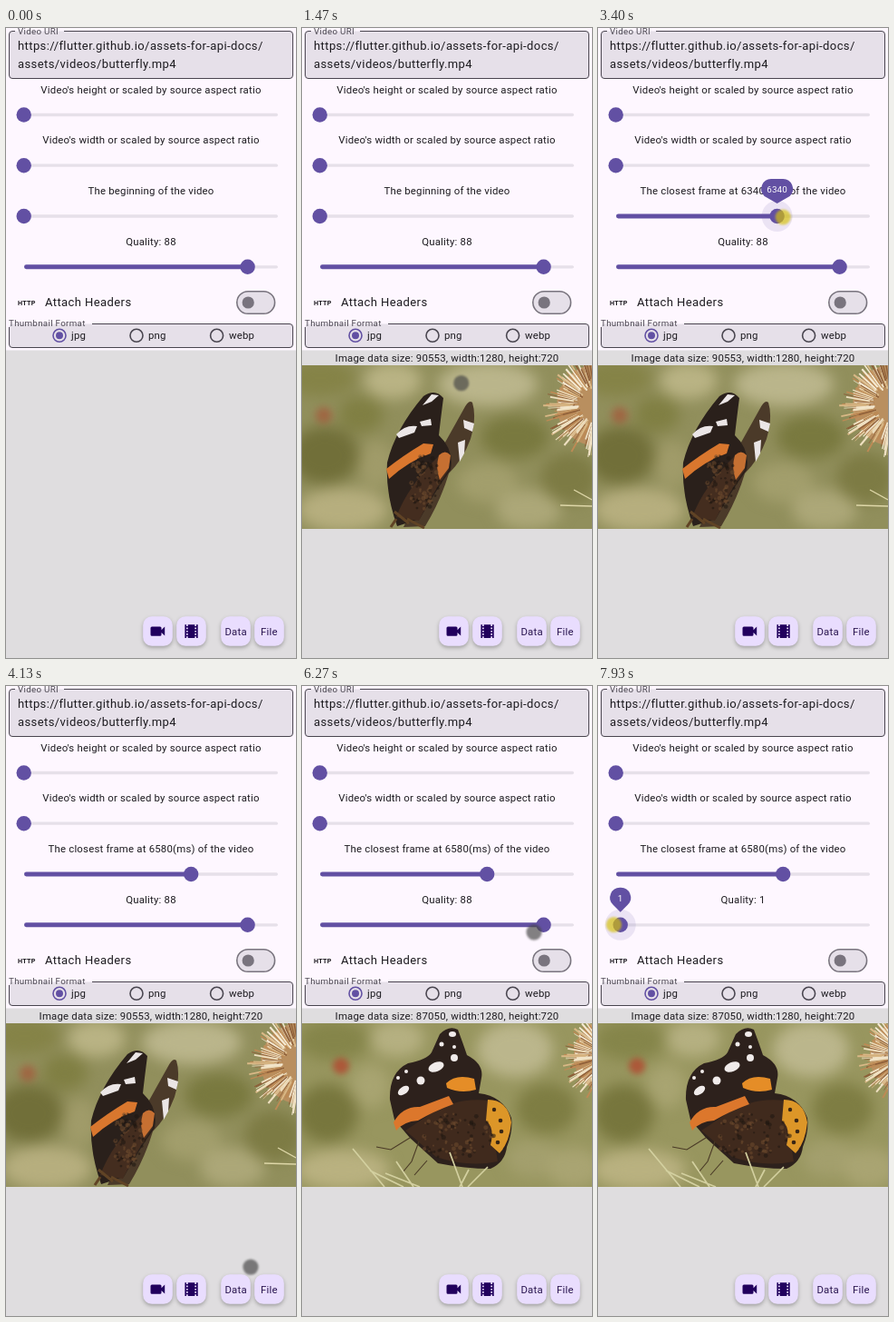
Recreate the animation shown at these times as an HTML page. Size 320 by 693 pixels, loop 8 s.

```html
<!DOCTYPE html>
<html lang="en">
<head>
<meta charset="utf-8">
<title>Video thumbnail demo</title>
<style>
  html, body { margin: 0; width: 100%; height: 100%; overflow: hidden; background: #dfdddf; }
  svg { display: block; }
  #stage { width: 100vw; height: 100vh; }
  text { font-family: Roboto, sans-serif; font-size: 11.4px; letter-spacing: .204px; fill: #1d1b20; white-space: pre; }
  .mid { text-anchor: middle; }
  .big { font-size: 13.03px; letter-spacing: .407px; }
  .label { font-size: 9.77px; letter-spacing: .305px; fill: #49454f; }
  .field { fill: #e6e0e9; stroke: none; }
  .outline { fill: none; stroke: #49454f; stroke-width: 1; }
  .fab { fill: #e9ddfe; filter: drop-shadow(0 2px 2px rgba(0, 0, 0, .28)); }
  .ink { fill: #21005d; }
  .fabText { fill: #2a1650; }
  .blur { filter: blur(8px); }
  .soft { filter: blur(.7px); }
</style>
</head>
<body>
<svg id="stage" viewBox="0 0 320 693" preserveAspectRatio="none">
  <rect width="320" height="693" fill="#dfdddf"/>
  <rect width="320" height="354.5" fill="#fef7ff"/>

  <rect class="field" x="3.5" y="3.5" width="313" height="52" rx="3.5"/>
  <path class="outline" d="M10 3.5H7Q3.5 3.5 3.5 7V52Q3.5 55.5 7 55.5H313Q316.5 55.5 316.5 52V7Q316.5 3.5 313 3.5H64"/>
  <text class="label" x="13" y="6.6">Video URI</text>
  <text class="big" x="13" y="23.8">https://flutter.github.io/assets-for-api-docs/</text>
  <text class="big" x="13" y="43.6">assets/videos/butterfly.mp4</text>

  <text class="mid" x="160" y="71.7">Video's height or scaled by source aspect ratio</text>
  <text class="mid" x="160" y="127.4">Video's width or scaled by source aspect ratio</text>
  <text class="mid" x="160" y="183.1" id="timeText"></text>
  <text class="mid" x="160" y="238.9" id="qualityText"></text>
  <g id="sliders"></g>

  <text x="13" y="304.6" style="font-size:7.2px;font-weight:700;letter-spacing:.3px">HTTP</text>
  <text class="big" x="43" y="306.3">Attach Headers</text>
  <rect x="254.8" y="289.7" width="41.8" height="24.6" rx="12.3" fill="#e6e0e9" stroke="#79747e" stroke-width="1.6"/>
  <circle cx="267.2" cy="302" r="6.6" fill="#79747e"/>

  <rect class="field" x="3.5" y="325.5" width="313" height="26" rx="3.5"/>
  <path class="outline" d="M3.5 329V348Q3.5 351.5 7 351.5H313Q316.5 351.5 316.5 348V329Q316.5 325.5 313 325.5H95"/>
  <text class="label" x="3" y="328.4">Thumbnail Format</text>
  <g fill="none" stroke="#49454f" stroke-width="1.6">
    <circle cx="59" cy="338.3" r="7" stroke="#6250a3"/>
    <circle cx="144" cy="338.3" r="7"/>
    <circle cx="232.6" cy="338.3" r="7"/>
  </g>
  <circle cx="59" cy="338.3" r="4" fill="#6250a3"/>
  <text x="72" y="342.4">jpg</text>
  <text x="157" y="342.4">png</text>
  <text x="246" y="342.4">webp</text>

  <text class="mid" x="160" y="367" id="sizeText"></text>

  <svg id="photoA" x="0" y="371" width="320" height="180" viewBox="0 371 320 180">
    <rect y="371" width="320" height="180" fill="#918f5c"/>
    <g class="blur">
      <ellipse cx="20" cy="385" rx="40" ry="20" fill="#858347"/>
      <ellipse cx="100" cy="388" rx="32" ry="20" fill="#b9b384"/>
      <ellipse cx="205" cy="392" rx="55" ry="24" fill="#bab58b"/>
      <ellipse cx="65" cy="425" rx="25" ry="20" fill="#807f43"/>
      <ellipse cx="25" cy="470" rx="38" ry="32" fill="#716f39"/>
      <ellipse cx="82" cy="480" rx="20" ry="26" fill="#a09b69"/>
      <ellipse cx="45" cy="530" rx="50" ry="24" fill="#b6ae7e"/>
      <ellipse cx="235" cy="450" rx="38" ry="24" fill="#79793f"/>
      <ellipse cx="205" cy="500" rx="34" ry="22" fill="#a29e6c"/>
      <ellipse cx="250" cy="530" rx="36" ry="22" fill="#aca778"/>
      <ellipse cx="295" cy="495" rx="32" ry="28" fill="#7d7b44"/>
    </g>
    <circle cx="24" cy="426" r="9" fill="#a5583a" opacity=".75" style="filter:blur(4px)"/>
    <g class="thistle" data-at="326,415" data-size="59"></g>
    <path d="M285 525L320 526M300 508L320 519" stroke="#ded7a8" stroke-width="1.3"/>
    <g class="soft">
      <path d="M178 420Q184 408 188 412Q193 428 186 452Q178 474 162 490Q153 520 136 548L112 549L150 470Z" fill="#4b3a29"/>
      <path d="M134 405Q147 396 156 407Q153 430 151 448Q168 464 164 486Q148 508 130 540L105 548Q92 512 94 478Q103 441 134 405Z" fill="#2a201b"/>
      <path d="M104 538Q117 503 152 470L162 486Q146 508 129 542Z" fill="#442d1f"/>
      <path d="M93 485Q112 470 134 457L145 458L142 468Q118 476 96 496Z" fill="#d9772e"/>
      <path d="M151 470Q158 463 164 470L162 484L152 497Q147 484 151 470Z" fill="#c67032"/>
      <g fill="#ebe6e6">
        <path d="M133 415L143 403L151 404L143 411ZM130 433L142 430L143 437L132 438ZM104 447Q114 436 127 438L124 445L107 451Z"/>
        <path d="M172 456L180 453L179 468L174 477ZM178 431L190 435L188 444L179 440Z"/>
      </g>
      <path d="M102 532L118 545M104 540L98 549M116 540L135 550" stroke="#604325" stroke-width="3"/>
    </g>
    <g class="speckles" data-at="135,500" data-size="17,32"></g>
  </svg>

  <svg id="photoB" x="0" y="371" width="320" height="180" viewBox="0 371 320 180">
    <rect y="371" width="320" height="180" fill="#98965f"/>
    <g class="blur">
      <ellipse cx="35" cy="390" rx="40" ry="22" fill="#85854a"/>
      <ellipse cx="105" cy="388" rx="30" ry="20" fill="#b5b081"/>
      <ellipse cx="235" cy="400" rx="42" ry="30" fill="#bbb68c"/>
      <ellipse cx="75" cy="440" rx="22" ry="24" fill="#a8a471"/>
      <ellipse cx="28" cy="470" rx="34" ry="32" fill="#77763d"/>
      <ellipse cx="45" cy="532" rx="52" ry="22" fill="#b9b180"/>
      <ellipse cx="270" cy="465" rx="34" ry="28" fill="#7e7d43"/>
      <ellipse cx="255" cy="520" rx="30" ry="20" fill="#a39f6d"/>
      <ellipse cx="300" cy="530" rx="30" ry="22" fill="#a9a472"/>
    </g>
    <circle cx="43" cy="418" r="9" fill="#b24a31" opacity=".8" style="filter:blur(3px)"/>
    <g class="thistle" data-at="340,407" data-size="53"></g>
    <g class="soft">
      <path d="M152 383Q162 373 172 378Q178 394 182 406Q201 416 198 431L195 448Q222 451 231 475Q233 490 226 507Q224 524 208 531Q180 531 150 525L119 497L102 477L97 455Q96 425 117 415Q138 411 143 403Z" fill="#2d211c"/>
      <path d="M140 472Q170 452 205 456L216 523Q184 530 148 518L114 489Z" fill="#402a1d"/>
      <path d="M101 480Q111 462 130 463L162 451L167 460Q145 468 128 478Q112 479 104 489Z" fill="#dc772c"/>
      <path d="M159 437Q170 426 190 432L192 444Q175 449 160 442Z" fill="#e58d27"/>
      <path d="M205 455Q227 455 231 480Q229 502 218 514L208 505Q213 486 203 478Z" fill="#dc9628"/>
      <g fill="#392615">
        <circle cx="212" cy="466" r="2.2"/><circle cx="219" cy="478" r="2.3"/>
        <circle cx="220" cy="490" r="2.3"/><circle cx="216" cy="502" r="2.3"/>
      </g>
      <g fill="#f0ebea">
        <ellipse cx="166" cy="383" rx="4" ry="3"/><circle cx="154" cy="394" r="2.5"/>
        <circle cx="168" cy="397" r="2"/><circle cx="168" cy="409" r="4"/>
        <ellipse cx="148" cy="419" rx="9" ry="5" transform="rotate(-22 148 419)"/>
        <circle cx="131" cy="434" r="4.5"/><ellipse cx="112" cy="445" rx="7" ry="4" transform="rotate(-35 112 445)"/>
        <circle cx="106" cy="431" r="2"/><circle cx="115" cy="424" r="2"/>
      </g>
      <path d="M129 501L121 523L111 535M119 497L98 510L82 507M138 522L124 538" fill="none" stroke="#4a3a26" stroke-width="1.1"/>
    </g>
    <g class="speckles" data-at="170,495" data-size="42,26"></g>
    <path class="soft" d="M56 509L91 551M75 533L112 551M104 523L123 551M92 536L130 551M163 513L177 551M184 532L174 551M205 529L183 551" stroke="#d3d0a0" stroke-width="1.7"/>
  </svg>

  <g id="fabs"></g>
  <circle id="ripple" cx="253.5" cy="663.5" fill="#21005d" opacity="0"/>
  <path class="ink" d="M161 658.5H170Q171.5 658.5 171.5 660V662.2L175.2 658.6V668.6L171.5 665V667.2Q171.5 668.7 170 668.7H161Q159.5 668.7 159.5 667.2V660Q159.5 658.5 161 658.5Z"/>
  <path class="ink" fill-rule="evenodd" d="M197.4 656.3H199V658H200.7V656.3H208.3V658H210V656.3H211.7V671H210V669.3H208.3V671H200.7V669.3H199V671H197.4ZM199 659.6V661.2H200.7V659.6ZM199 662.9V664.5H200.7V662.9ZM199 666.1V667.7H200.7V666.1ZM208.3 659.6V661.2H210V659.6ZM208.3 662.9V664.5H210V662.9ZM208.3 666.1V667.7H210V666.1Z"/>
  <text class="mid fabText" x="253.6" y="667.6">Data</text>
  <text class="mid fabText" x="290.4" y="667.6">File</text>
  <circle id="pointer" r="8.6" style="filter:blur(.9px)"/>
</svg>

<script>
const LOOP = 8000;
const PURPLE = '#6250a3';
const TRACK_START = 20, TRACK_LENGTH = 280;
const $ = id => document.getElementById(id);
const clamp = (v, lo, hi) => Math.min(hi, Math.max(lo, v));

function set(node, attrs) {
  for (const key in attrs) node.setAttribute(key, attrs[key]);
}
function add(parent, tag, attrs) {
  const node = document.createElementNS('http://www.w3.org/2000/svg', tag);
  set(node, attrs);
  return parent.appendChild(node);
}
function random(seed) {
  return () => (seed = seed * 16807 % 2147483647) / 2147483647;
}
const pair = text => text.split(',').map(Number);

// Dry flower head: fine bristles around a centre beyond the right edge.
for (const group of document.querySelectorAll('.thistle')) {
  const [x, y] = pair(group.dataset.at);
  const size = +group.dataset.size, rnd = random(91);
  add(group, 'circle', { cx: x, cy: y, r: size * .76, fill: '#b98f5f' });
  const tones = ['#efe0c1', '#d9b886', '#8e5f39', '#f5ead3', '#bd8a55'];
  for (let i = 0; i < 130; i++) {
    const angle = Math.PI * (.5 + rnd()), outer = size * (.62 + rnd() * .4), inner = outer * .5;
    const c = Math.cos(angle), s = Math.sin(angle);
    add(group, 'path', {
      d: `M${x + inner * c} ${y + inner * s}L${x + outer * c} ${y + outer * s}`,
      stroke: tones[i % tones.length], 'stroke-width': .7 + rnd() * 1.4
    });
  }
}

// Mottled wing scales.
for (const group of document.querySelectorAll('.speckles')) {
  const [x, y] = pair(group.dataset.at), [rx, ry] = pair(group.dataset.size), rnd = random(37);
  for (let i = 0; i < 90; i++) {
    const angle = 2 * Math.PI * rnd(), reach = Math.sqrt(rnd());
    add(group, 'circle', {
      cx: x + rx * reach * Math.cos(angle), cy: y + ry * reach * Math.sin(angle),
      r: 1 + rnd() * 1.6, fill: i % 2 ? '#1e1510' : '#6d4a2e', opacity: .55
    });
  }
}

for (const x of [167.5, 204.5, 253.5, 290.5])
  add($('fabs'), 'rect', { class: 'fab', x: x - 16.3, y: 647.2, width: 32.6, height: 32.6, rx: 9.8 });

function makeSlider(y) {
  const group = add($('sliders'), 'g', {});
  const track = (height, fill) => add(group, 'rect', {
    x: TRACK_START, y: y - height / 2, width: TRACK_LENGTH, height, rx: height / 2, fill
  });
  track(3.3, '#e6e0e9');
  const active = track(4.9, PURPLE);
  const halo = add(group, 'circle', { cy: y, fill: PURPLE, opacity: .12 });
  const thumb = add(group, 'circle', { cy: y, r: 8.2, fill: PURPLE });
  const bubble = add(group, 'g', {});
  const shape = add(bubble, 'path', { fill: PURPLE });
  const value = add(bubble, 'text', { class: 'mid', y: 4, style: 'fill:#fff;font-size:9.8px' });
  return (x, grip = 0, label = '') => {
    set(active, { width: Math.max(0, x - TRACK_START) });
    set(thumb, { cx: x });
    set(halo, { cx: x, r: 17 * grip });
    set(bubble, { transform: `translate(${x} ${y - 14 - 16 * grip}) scale(${grip})` });
    const half = Math.max(0, label.length - 2) * 3;
    set(shape, { d: `M${-half} -11H${half}A11 11 0 0 1 ${half + 8} 8L0 16L${-half - 8} 8A11 11 0 0 1 ${-half} -11Z` });
    value.textContent = label;
  };
}
const [heightSlider, widthSlider, timeSlider, qualitySlider] = [95.5, 151.2, 207, 262.8].map(makeSlider);
heightSlider(TRACK_START - .3);
widthSlider(TRACK_START - .3);

// Time, x, y of the pointer.
const PATH = [
  [350, 280, 608], [700, 258, 667], [1120, 258, 667], [1470, 176, 391],
  [1950, 54, 232], [2600, 32, 208.5], [2720, 20, 207], [2820, 20, 207],
  [3380, 204.2, 208], [3560, 204.2, 208], [4130, 270, 639], [4380, 258, 667],
  [5270, 258, 667], [5950, 262, 290], [6270, 256, 271], [6430, 266.4, 263],
  [6550, 266.4, 263], [7930, 17.5, 262.5], [8000, 17.5, 262.5]
];
function pointerAt(t) {
  const i = clamp(PATH.findIndex(p => p[0] > t), 1, PATH.length - 1);
  const [a, b] = [PATH[i - 1], PATH[i]];
  const u = clamp((t - a[0]) / (b[0] - a[0]), 0, 1);
  return { x: a[1] + (b[1] - a[1]) * u, y: a[2] + (b[2] - a[2]) * u };
}

const TIME_DRAG = [2740, 3480], QUALITY_DRAG = [6450, 8100];
const TAPS = [[760, 880], [4430, 4550]];
const FIRST_PHOTO = 960, SECOND_PHOTO = 4880, THUMB_LAG = 41;
const within = (t, [from, to]) => t >= from && t < to;
const gripAt = (t, [from, to]) => clamp(Math.min((t - from) / 100, (to + 100 - t) / 100), 0, 1);
const draggedX = (t, [from, to]) => pointerAt(clamp(t - THUMB_LAG, from, to)).x;

function render(t) {
  const { x, y } = pointerAt(t);
  const pressed = [TIME_DRAG, QUALITY_DRAG, ...TAPS].some(span => within(t, span));
  set($('pointer'), {
    cx: x, cy: y,
    fill: pressed ? '#d6c20a' : '#464646',
    opacity: t < PATH[0][0] ? 0 : .67
  });

  const timeX = t < TIME_DRAG[0] ? TRACK_START - .3 : draggedX(t, TIME_DRAG);
  const ms = Math.max(0, Math.round((timeX - TRACK_START) / TRACK_LENGTH * 1000) * 10);
  timeSlider(timeX, gripAt(t, TIME_DRAG), String(ms));
  $('timeText').textContent = ms ? `The closest frame at ${ms}(ms) of the video` : 'The beginning of the video';

  const idle = t < QUALITY_DRAG[0];
  const qualityX = idle ? 266.6 : Math.max(TRACK_START, draggedX(t, QUALITY_DRAG));
  const target = idle ? qualityX : x;
  const quality = Math.max(1, Math.round((target - TRACK_START) / TRACK_LENGTH * 100));
  qualitySlider(qualityX, gripAt(t, QUALITY_DRAG), String(quality));
  $('qualityText').textContent = `Quality: ${quality}`;

  const second = t >= SECOND_PHOTO, first = t >= FIRST_PHOTO && !second;
  $('photoA').style.display = first ? '' : 'none';
  $('photoB').style.display = second ? '' : 'none';
  $('sizeText').textContent = first || second
    ? `Image data size: ${second ? 87050 : 90553}, width:1280, height:720` : '';

  const tap = TAPS.find(([from]) => within(t, [from, from + 300]));
  const u = tap ? (t - tap[0]) / 300 : 0;
  set($('ripple'), { r: 16 * Math.min(1, u * 2), opacity: tap ? .12 * (1 - u) : 0 });
}

const start = performance.now();
function frame() {
  render((performance.now() - start) % LOOP);
  requestAnimationFrame(frame);
}
frame();
</script>
</body>
</html>
```
